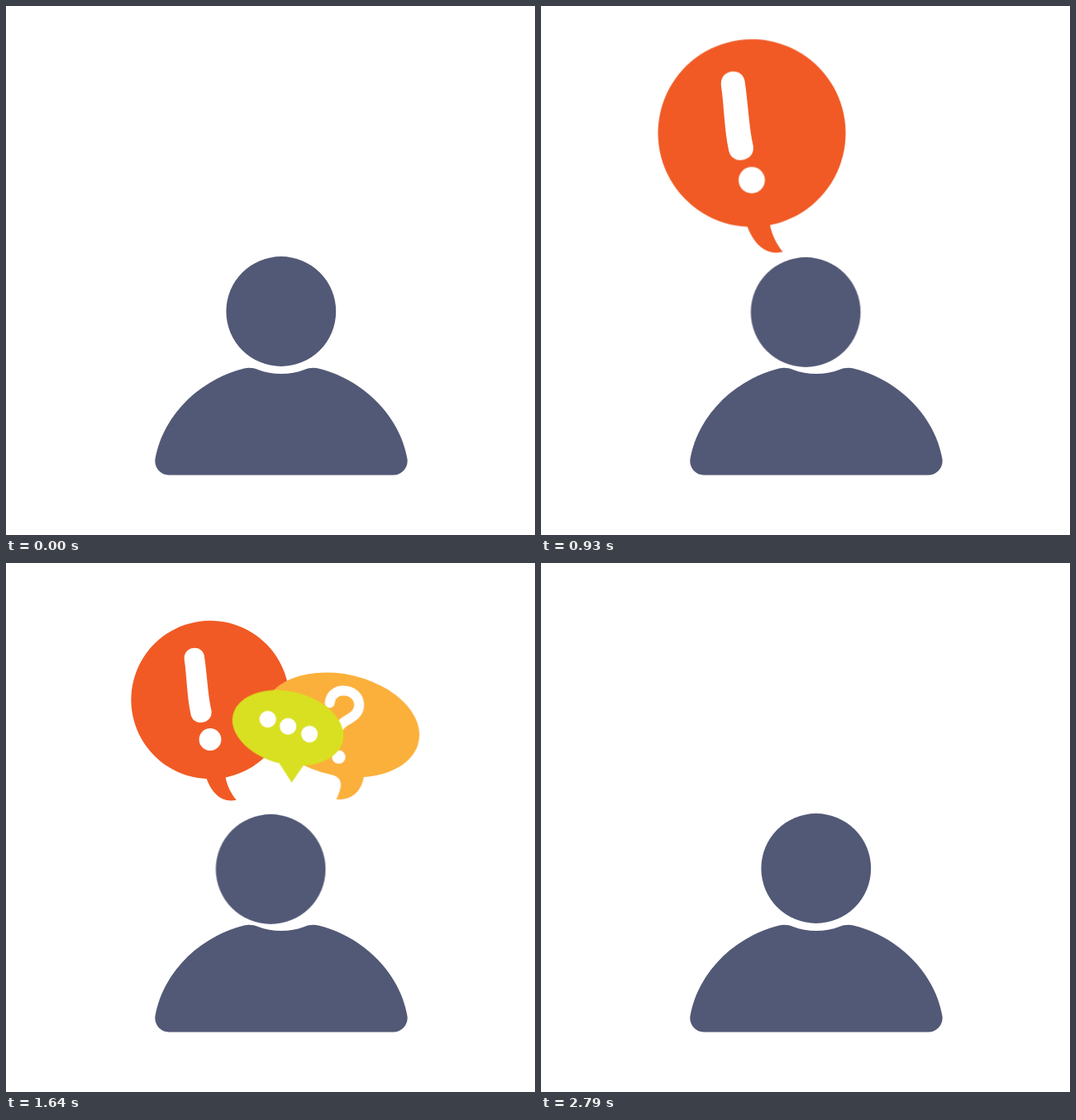
An HTML page that plays this animation: 640x640 px, repeating every 3.07 s.

```html
<!DOCTYPE html>
<html lang="en">
<head>
<meta charset="utf-8">
<title>Person with speech bubbles</title>
<style>
  html, body { margin: 0; width: 100%; height: 100%; overflow: hidden; background: #fff; }
  svg { display: block; width: 100%; height: 100%; }
  .person { fill: #525976; }
  .mark { fill: #fff; }
  .line { fill: none; stroke: #fff; stroke-width: 11.2; stroke-linecap: round; }
</style>
</head>
<body>
<svg viewBox="0 0 640 640">
  <path class="person" d="M197 567.5C187 567.5 179 558.5 180.5 548C190 495 234 452 288 438.5C294 437 300 438 305 440C322 446.8 344 446.8 361 440C366 438 372 437 378 438.5C432 452 476 495 485.5 548C487 558.5 479 567.5 468.5 567.5Z"/>
  <circle id="head" class="person" cx="332.8" cy="369.5" r="66.4"/>

  <g id="alert">
    <path fill="#f15a24" d="M242.6 261.1A95.7 95.7 0 1 1 265.6 259.4C267.5 269 272 278.5 278.7 286.8C261 290.5 249.5 279 242.6 261.1Z"/>
    <path class="mark" d="M215.8 117.5C213.5 100 237.5 97.5 239.9 112.5C243.5 137 244 158 248.4 178C251.5 194.5 227 199 223.6 183.5C218.8 161 219 139 215.8 117.5Z"/>
    <circle class="mark" cx="247" cy="213.5" r="13.4"/>
  </g>

  <g id="question">
    <path fill="#fbb03b" d="M393 257.95A89.2 57 12.5 1 1 430.9 260.9C427.5 279 416 286.8 400 286C402 281.5 404 277 404.8 272C406 264.5 402.5 260 393 257.95Z"/>
    <path class="line" d="M392.6 177.6C393.5 168.5 400 163.7 408 163.7C418 163.7 425.6 170.5 425.6 180C425.6 197 401.5 195.5 401.3 211V217"/>
    <circle class="mark" cx="402.7" cy="238.3" r="7.6"/>
  </g>

  <g id="chat">
    <path fill="#d9e021" d="M328.9 164.7A76 48.9 13.8 1 1 361.2 167.9L345.5 190.8Z"/>
    <circle class="mark" cx="313.5" cy="105.5" r="11.2"/>
    <circle class="mark" cx="340.7" cy="115" r="11.2"/>
    <circle class="mark" cx="369.5" cy="125.5" r="11.2"/>
  </g>
</svg>
<script>
  const FPS = 14, TICKS = 43, LOOP = 3070;

  // One entry per tick after a bubble is launched.
  const SCALE = [0, .12, .36, .65, .9, 1.08, 1.186, 1.2, 1.147, 1.108, 1.077, 1.054, 1.036, 1.016, 1];
  const AWAY = [.87, .756, .635, .5, .35, .2, .093, .022, 0];

  // launch and fade are ticks; from is the launch point, at is the resting tail point.
  const bubbles = [
    { id: 'alert',    launch: 7,  fade: 30, from: [333, 405], at: [247.2, 287.5] },
    { id: 'question', launch: 13, fade: 32, from: [351, 405], at: [405.3, 286] },
    { id: 'chat',     launch: 19, fade: 32, from: [342, 405], at: [340.5, 191] }
  ];

  const get = id => document.getElementById(id);

  function ease(tick, start, length) {
    const u = Math.min(1, Math.max(0, (tick - start) / length));
    return u * u * (3 - 2 * u);
  }

  function pick(table, i) {
    return table[Math.max(0, Math.min(table.length - 1, i))];
  }

  // Holds each pose for one tick, with tick times rounded to 10 ms.
  function play(el, pose) {
    const frames = Array.from({ length: TICKS }, (_, k) => ({
      ...pose(k),
      offset: Math.round(k * 100 / FPS) * 10 / LOOP,
      easing: 'step-end'
    }));
    frames.push({ ...pose(TICKS - 1), offset: 1 });
    el.animate(frames, { duration: LOOP, iterations: Infinity });
  }

  play(get('head'), k => {
    const lean = ease(k, 5, 7) - ease(k, 34, 5);
    return { transform: `translate(${-12.6 * lean}px, ${0.9 * lean}px)` };
  });

  for (const { id, launch, fade, from, at } of bubbles) {
    const group = get(id);
    play(group, k => {
      const away = pick(AWAY, k - launch);
      const [x, y] = at.map((v, i) => v + (from[i] - v) * away);
      const s = pick(SCALE, k - launch);
      return { transform: `translate(${x}px, ${y}px) scale(${s}) translate(${-at[0]}px, ${-at[1]}px)` };
    });
    for (const part of group.children) {
      play(part, k => ({ opacity: 1 - ease(k, fade, 5) }));
    }
  }
</script>
</body>
</html>
```
